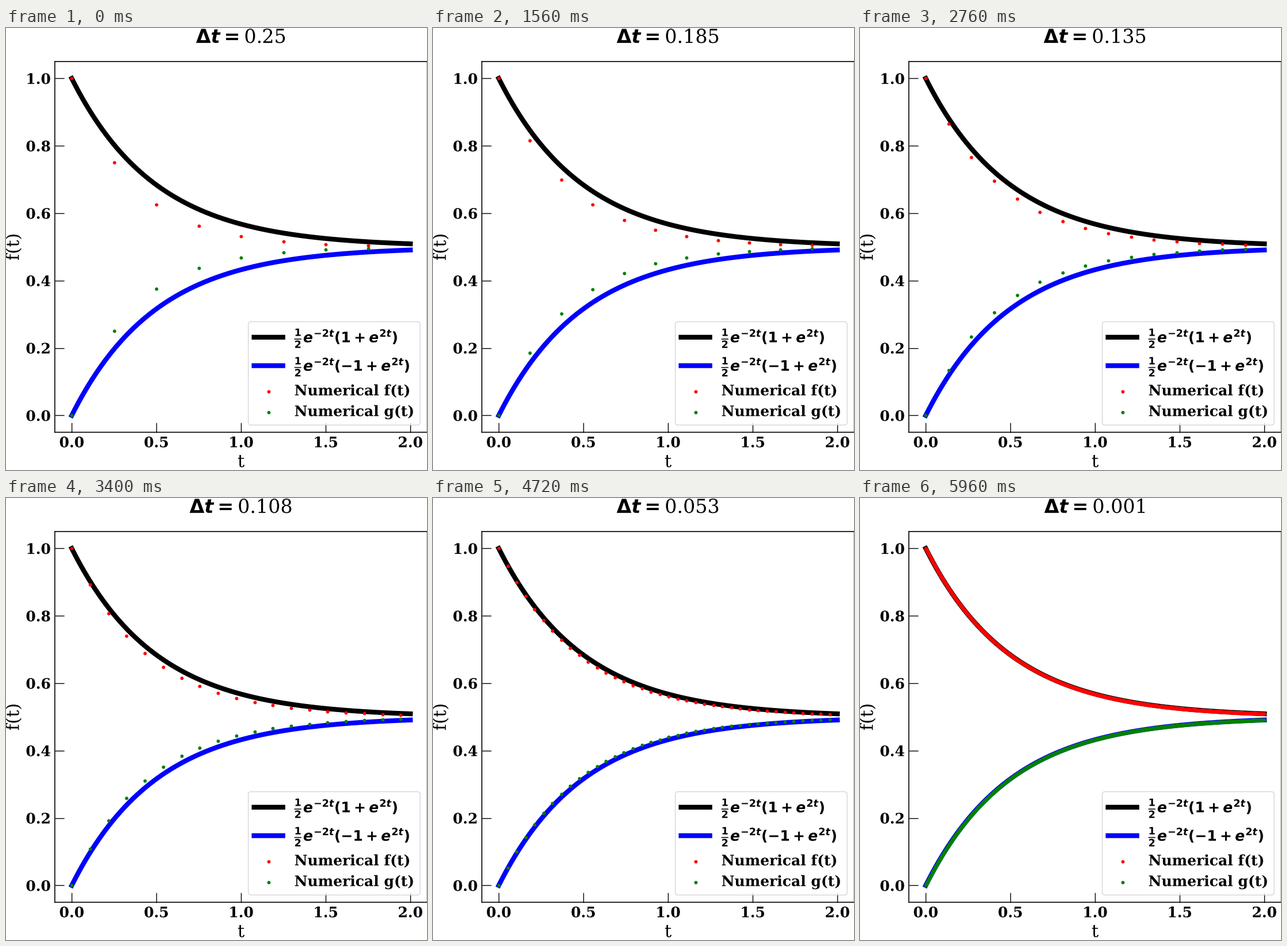
Recreate the animation shown at these times as a matplotlib script. Size 731 by 766 pixels, loop 6 s.

```python
import numpy as np
import matplotlib.pyplot as plt
from matplotlib.animation import FuncAnimation
from matplotlib.patheffects import Normal

W, H, DPI = 731, 766, 100
FRAMES, INTERVAL = 150, 40
T_END = 2.0

# Path effects draw text and markers as outlines at sub-pixel positions.
plt.rcParams.update({
    "font.family": "DejaVu Serif",
    "font.weight": "bold",
    "font.size": 18,
    "axes.linewidth": 1.2,
    "axes.labelsize": 22,
    "axes.titlesize": 24,
    "text.hinting": "none",
    "path.snap": False,
    "path.effects": [Normal()],
})

steps = np.linspace(0.25, 0.001, FRAMES)


def exact(t):
    decay = np.exp(-2 * t)
    return (1 + decay) / 2, (1 - decay) / 2


def euler(dt):
    """Forward Euler for f' = g - f, g' = f - g, in closed form."""
    t = np.arange(0, T_END, dt)
    decay = (1 - 2 * dt) ** np.arange(len(t))
    return t, (1 + decay) / 2, (1 - decay) / 2


def dots(color, label):
    return ax.scatter([], [], s=18, color=color, linewidths=0, zorder=3,
                      label=label)


fig = plt.figure(figsize=(W / DPI, H / DPI), dpi=DPI, facecolor="white")
left, top, width, height = 84.75, 58.18, 646.8, 642.4
ax = fig.add_axes([left / W, 1 - (top + height) / H, width / W, height / H])
ax.set_xticks(np.linspace(0, 2, 5))
ax.set_yticks(np.linspace(0, 1, 6))
ax.tick_params(direction="in", length=12, width=1, pad=5)
ax.set_xlabel("t")
ax.set_ylabel("f(t)")
title = ax.set_title("", y=1.05, pad=0)

t = np.linspace(0, T_END, 400)
f, g = exact(t)
ax.plot(t, f, color="black", lw=6, label=r"$\frac{1}{2}e^{-2t}(1+e^{2t})$")
ax.plot(t, g, color="blue", lw=6, label=r"$\frac{1}{2}e^{-2t}(-1+e^{2t})$")
f_dots = dots("red", "Numerical f(t)")
g_dots = dots("green", "Numerical g(t)")
ax.set_xlim(-0.1, 2.1)
ax.set_ylim(-0.05, 1.05)
ax.legend(loc="lower right", fontsize=18, labelspacing=0.47, scatterpoints=1)


def update(i):
    dt = steps[i]
    t, f, g = euler(dt)
    f_dots.set_offsets(np.column_stack([t, f]))
    g_dots.set_offsets(np.column_stack([t, g]))
    title.set_text(rf"$\Delta t = ${round(float(dt), 3)}")
    return f_dots, g_dots, title


anim = FuncAnimation(fig, update, frames=FRAMES, interval=INTERVAL,
                     repeat=True, repeat_delay=0, blit=False)
plt.show()
```
